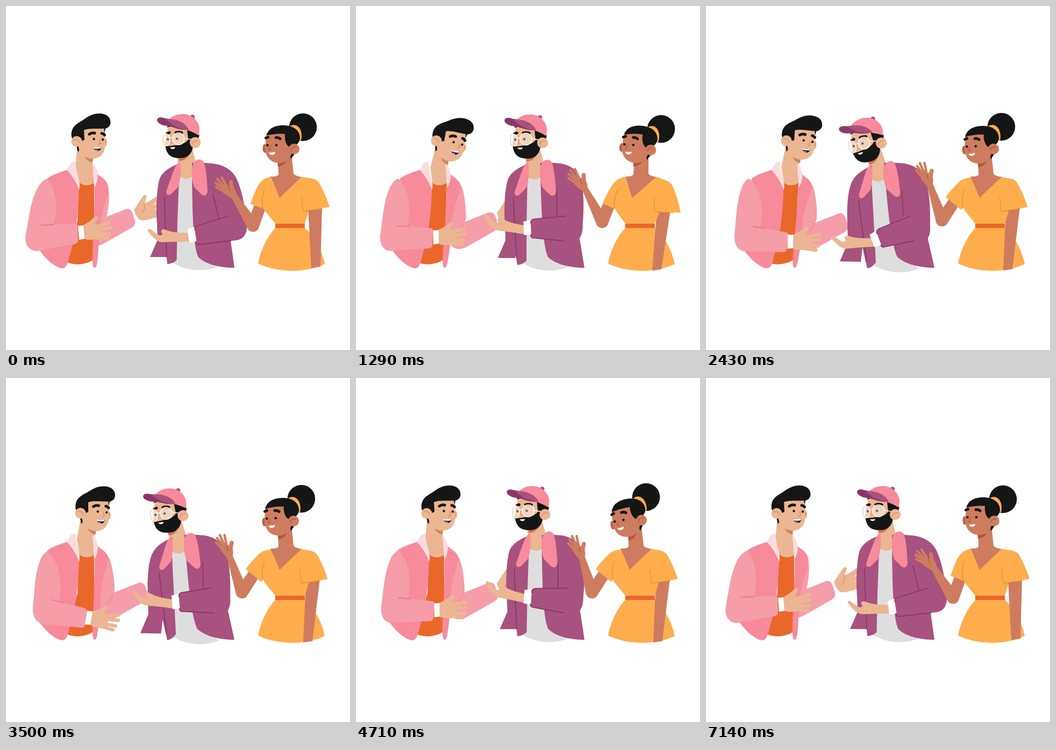
An HTML page for the animation above (7.21 s loop, 640 by 640 pixels).

```html
<!DOCTYPE html>
<html lang="en">
<head>
<meta charset="utf-8">
<title>Three friends talking</title>
<style>
html, body { margin: 0; width: 100%; height: 100%; overflow: hidden; background: #fff; }
svg { display: block; width: 100%; height: 100%; }
.pink { fill: #f78a9b; } .rose { fill: #f59da8; } .blush { fill: #fbdcde; } .orange { fill: #ea672a; }
.skin { fill: #ebb691; } .ink { fill: #151616; } .plum { fill: #a8527f; } .wine { fill: #8c3668; }
.grey { fill: #dedede; } .tan { fill: #ce7c5f; } .gold { fill: #ffad4d; } .white { fill: #fff; }
.line { fill: none; stroke-linecap: round; stroke-linejoin: round; stroke-width: 1.3; }
.brow { stroke: #151616; stroke-width: 5; }
</style>
</head>
<body>
<svg viewBox="0 0 640 640">
  <g id="left">
    <g id="farArm">
      <path class="skin" d="M239 378L254 355Q258 349 262 354L258 367Q270 362 280 354L286 356L286 362L273 370L286 366L286 374L276 378L286 377L286 390Q262 401 249 398Q241 391 238 378Z"/>
      <path class="line" stroke="#d58f66" d="M257 367Q260 379 253 384"/>
      <path class="rose" d="M152 406L223 378C230 376 234 381 236 387L240 400C241 406 238 410 233 413L180 443C166 449 156 445 152 437Z"/>
    </g>
    <path id="shirtL" class="orange" d="M135 326L164 326L164 400L163 472Q138 487 111 476L133 400Z"/>
    <path id="coatL" class="pink" d="M113 305C98 310 84 315 77 321L66 350L62 454C75 472 92 487 105 488C115 488 116 470 122 452C131 420 135 375 136 338L130 310Z"/>
    <path id="stripL" class="pink"/>
    <path id="upperL" class="rose"/>
    <path id="neckL" class="skin" d="M133 258L129 300L137 329Q150 338 164 329L161 292L162 270Z"/>
    <path id="collarL" class="blush" d="M113 305L120 293Q125 289 130 290C128 310 141 325 136 342Q128 320 113 305ZM161 292Q170 300 171 318Q169 332 164 338Z"/>
    <g id="headL">
      <path fill="#cb8560" d="M146 279L162 283L161 291Q150 289 146 279Z"/>
      <path class="ink" d="M131 260L139 263L134 272Z"/>
      <ellipse class="skin" cx="184.5" cy="254" rx="3.5" ry="7.5"/>
      <path class="line" stroke="#cf7f5a" d="M185 249Q187 253 184 259"/>
      <path class="skin" d="M143 226L183 226L185 252C186 272 177 283 162 284C146 284 136 274 134 258Z"/>
      <path class="ink" d="M122 243C120 226 130 220 142 213C152 206 160 200 174 200C188 200 195 208 194.5 217C194 224 189 227 185 228L183.5 236L182 228C168 229 154 227 145 231L146 249L139 252L124 250Z"/>
      <circle class="skin" cx="131.5" cy="252" r="10"/>
      <path class="line" stroke="#d58f66" d="M126 249Q134 247 137 255"/>
      <path class="line brow" d="M155 238.5Q160 235 165 236.5M178 237Q181 237 183.5 240"/>
      <circle class="ink" cx="163.5" cy="247.5" r="2.2"/>
      <circle class="ink" cx="180" cy="248.5" r="2.2"/>
      <path class="line" stroke="#dd8259" d="M174.5 248L176 256L172 257"/>
      <path class="ink" d="M162 262Q170 264 177 261.5C178 268 172 271 168 269Q163 267 162 262Z"/>
      <path class="white" d="M162 262Q170 264 177 261.5L176 265Q169 266 163 265Z"/>
      <path fill="#c06aa0" d="M165 267.5Q169 265 172 269Q168 270 165 267.5Z"/>
    </g>
    <g id="armL">
      <path id="sleeveL" class="rose"/>
      <path id="creaseL" class="line" stroke="#dc7484"/>
    </g>
    <g id="handL">
      <path class="skin" d="M3 -13C12 -17 20 -24 26 -30Q33 -31 31 -25L25 -16L34 -12L38 8L34 13L12 14L5 12Z"/>
      <path class="line" stroke="#ebb691" style="stroke-width:6.4" d="M25 -10L52 -18M27 -4L54.5 -8.500M27 4L52 3M25 10L49 11"/>
      <path class="white" d="M-6 -12L4 -13L6 12L-4 14Z"/>
    </g>
  </g>

  <g id="middle">
    <path id="shirtM" class="grey" d="M320 316L347 316L352 440L395 485Q350 501 310 478L316 470Z"/>
    <path id="neckM" class="skin" d="M318 272L323 317Q335 326 347 317L353 290L346 262Z"/>
    <path id="coatM" class="plum"/>
    <path id="bodyM" class="plum"/>
    <path id="collarM" class="pink" d="M324 290C315 292 311 310 298 345Q299 355 307 350L320 337Q328 315 324 290ZM346 300C350 284 362 282 368 290C373 305 374 325 375 345Q373 356 364 351L350 337Q344 322 346 300Z"/>
    <path id="seamM" class="line" stroke="#8c3668" style="stroke-width:1.8" d="M295 355Q296 410 299 467"/>
    <g id="headM">
      <path fill="#d0764f" d="M320 279L342 274Q335 289 322 288Z"/>
      <path class="skin" d="M303 222L338 228L346 255L336 280L302 275L296 261L298 240Z"/>
      <path class="ink" d="M337 230L360 240L357 250L346 264L339 250ZM299 226L304 219L310 223Z"/>
      <path class="ink" d="M296.5 259C300 262 308 260 315 259C325 258 335 256 340 247L348 261C346 277 335 284 322 283C308 283 298 277 296.5 259Z"/>
      <path class="white" d="M305 263L315 262.5C314 267 307 267.5 305 263Z"/>
      <path class="line brow" d="M300 237L304 235.5M316 235.5Q322 234 327 236"/>
      <path class="line" stroke="#e08a5e" d="M308 246L305 254L309 255"/>
      <circle class="ink" cx="301" cy="248" r="2.3"/>
      <circle class="ink" cx="318" cy="247" r="2.3"/>
      <g stroke="#fdf5ee" stroke-width="1.7" fill="#fff" fill-opacity=".38">
        <circle cx="321" cy="247" r="11"/>
        <ellipse cx="298.5" cy="249" rx="6.5" ry="11"/>
        <path fill="none" d="M304.5 246Q307 244 310 246M332 246L345 248.5"/>
      </g>
      <path class="line" stroke="#efcbb0" d="M294 239C290 245 291 258 297 260"/>
      <circle class="skin" cx="352" cy="254" r="10.2"/>
      <path class="line" stroke="#d58f66" d="M346 257Q348 249 357 251"/>
      <circle class="plum" cx="347" cy="206.5" r="4.2"/>
      <path class="pink" d="M300 216C306 205 318 201 330 201C349 202 360 217 360 229L359 241C350 236 341 231 330 229Z"/>
      <path class="wine" d="M281 213C281 207 287 206 296 209C315 211 331 216 340 230C326 232 316 227 305 224C294 223 283 220 281 213Z"/>
      <path class="plum" d="M297 209.5C318 210 333 216 340 230C323 230 307 222 297 209.5Z"/>
    </g>
    <path id="foreM" class="plum"/>
    <path id="handM" class="skin" d="M3 -5L-20 -6C-30 -7 -38 -9 -45 -12C-51 -13 -53 -7 -48 -4C-50 0 -55 0 -58 -3L-69 -11C-74 -15 -78 -11 -74 -7C-66 3 -58 12 -48 12L-20 11L3 11Z"/>
    <path id="cuffM" class="white" d="M-2 -12.5L11 -16.5L15 11L1.5 12.5Z"/>
    <path id="foldM" class="line" stroke="#8c3668" style="stroke-width:1.8"/>
  </g>

  <g id="right">
    <path id="upperR" class="tan"/>
    <path id="foreR" class="tan"/>
    <g id="handR">
      <path class="tan" d="M5 -1L-4 5L-20 -5L-24 -13L-17 -20L-9 -17L-2 -18L3 -10Z"/>
      <path class="line" stroke="#ce7c5f" style="stroke-width:4.6" d="M-12 -16L-23 -34M-16 -15L-31 -31M-18 -13L-34 -24M-18 -8L-33 -16"/>
      <path class="line" stroke="#ce7c5f" style="stroke-width:7.4" d="M-3 -9L-5.5 -25"/>
      <path class="line" stroke="#b4583c" d="M-9 -20Q-12 -13 -7 -9"/>
    </g>
    <path class="gold" d="M501 413C484 431 473 457 469 479C505 497 558 497 593 480C588 456 575 429 556 413Z"/>
    <path id="armR" class="tan"/>
    <g id="torsoR">
      <path class="gold" d="M492 318L509 356L550 318L572 326L563 382L556 405L501 405L480 379L474 345Z"/>
      <path id="sleeveR" class="gold" d="M492 318C478 320 471 329 467 338C462 348 458 358 455 368L490 381.500L500 345Z"/>
      <path class="line" stroke="#ec8e2d" d="M481 341Q474 357 478 376"/>
      <g id="sleeveFar">
        <path class="gold" d="M550 318C565 320 576 321 581 327C588 337 597 358 602 374L553 382L540 345Z"/>
        <path class="line" stroke="#ec8e2d" d="M550 357L553 382L588 377"/>
      </g>
      <path class="tan" d="M506 285L507 314Q503 318 492 317L509 357L550 318Q537 316 535 312L531 275Z"/>
    </g>
    <path class="orange" d="M501 405H556V413H501Z"/>
    <g id="headR">
      <path fill="#b5573a" d="M505 289L523 286Q518 298 506 299Z"/>
      <circle class="ink" cx="552.5" cy="225.5" r="25.8"/>
      <path class="gold" d="M526 225C540 214 554 229 549 250L540 252Z"/>
      <path class="ink" d="M527 270L537 275L530 285Z"/>
      <ellipse cx="481.5" cy="265" rx="4" ry="8" fill="#b96246"/>
      <path class="tan" d="M485 236L520 232L533 262C533 282 522 292 508 292C491 291 482 280 482 262Z"/>
      <path class="ink" d="M485 241C487 228 500 222 515 222C536 222 547 232 547 246C546 255 540 260 529 263C521 260 518 250 519 238Q500 237 485 241Z"/>
      <circle class="tan" cx="536" cy="266" r="10"/>
      <path class="line" stroke="#ae5639" d="M530 269Q531 260 540 263"/>
      <path class="line brow" d="M483.5 245.5L487.5 244M502 245Q506 244 510 247"/>
      <circle class="ink" cx="486.5" cy="259" r="2.3"/>
      <circle class="ink" cx="503" cy="259" r="2.3"/>
      <path class="line" stroke="#b4583c" d="M492 260L489 267L493 268"/>
      <path class="white" d="M489 272.5Q495 273 501 271.5C501 278 491 279 489 272.5Z"/>
    </g>
  </g>
</svg>
<script>
const LOOP = 7210;
const $ = id => document.getElementById(id);
const set = (id, key, value) => $(id).setAttribute(key, value);

// Only cloth that truly changes shape has two poses.
const cloth = {
  stripL: ['M169 312C178 319 186 323 189 332C193 345 192 365 188 388C180 410 175 430 172 446C171 470 170 487 165 487C160 487 161 470 161 455Q165 390 165 330Z',
    'M169 312C178 319 186 323 190 332C198 350 201 370 202 395C195 420 180 430 174 446C171 470 170 487 165 487C160 487 161 470 161 455Q165 390 165 330Z'],
  upperL: ['M191 345C186 362 178 380 176 402L173 444L188 388C192 370 192 355 191 345Z',
    'M192 335C187 352 178 375 176 400L175 445L202 395C201 370 198 350 192 335Z'],
  sleeveL: ['M77 321C60 326 50 355 45 380L37 424C33 445 45 459 62 455L128 443Q135 441 134 435L133 409Q132 404 127 405L89 406C95 385 97 345 77 321Z',
    'M80 321C66 326 61 355 57 380L53.5 422C51 443 59 457 75 456L143 458Q149 458 150 453L153.5 428Q154 422 149 421L102 412C107 385 108 345 80 321Z'],
  creaseL: ['M65 408L89 406.5', 'M87 410L110 414'],
  coatM: ['M322 293C305 300 290 308 285 324C280 345 279 380 281 405L282 435L268 467L299 467L299 467L300 480Q310 480 317.5 473L319 400L322 320Z',
    'M309 297C292 304 277 314 271 328C263 345 262 380 263 405L264 440L249 475L288 476L291 449L300 488Q309 487 316 477L312 400L308 325Z'],
  bodyM: ['M346 292C360 290 372 292 385 293C403 297 415 305 421 322C427 345 426 380 423 408C423 418 421 426 418 430L417 433L425 487C395 487 368 479 357 466C348 440 347 390 346 320Z',
    'M346 292C360 290 372 292 385 293C408 296 425 308 431 326C440 347 446 380 448 408C449 424 442 434 428 436L418 437L425 487C395 487 368 479 357 466C348 440 347 390 346 320Z']
};

const number = /-?\d+(\.\d+)?/g;

function ease(t, from, to) {
  const u = Math.min(1, Math.max(0, (t - from) / (to - from)));
  return u * u * (3 - 2 * u);
}

// Goes from 0 to 1 between a and b, and back between c and d.
const swing = (t, a, b, c, d) => ease(t, a, b) - ease(t, c, d);

function morph(id, w) {
  const [rest, other] = cloth[id], goal = other.match(number);
  let n = 0;
  set(id, 'd', rest.replace(number, v => (+v + (goal[n++] - v) * w).toFixed(2)));
}

function place(id, x, y, turn, px = 0, py = 0) {
  set(id, 'transform', `translate(${x} ${y}) rotate(${turn}) translate(${-px} ${-py})`);
}

function shift(id, x, y = 0) {
  place(id, x, y, 0);
}

// Slants a part sideways around a level that stays put.
function slant(id, k, level, dx = 0, dy = 0) {
  set(id, 'transform', `matrix(1 0 ${k} 1 ${dx - k * level} ${dy})`);
}

function limb(id, x1, y1, r1, x2, y2, r2) {
  const len = Math.hypot(x2 - x1, y2 - y1), nx = (y1 - y2) / len, ny = (x2 - x1) / len;
  set(id, 'd', `M${x1 + nx * r1} ${y1 + ny * r1}L${x2 + nx * r2} ${y2 + ny * r2}A${r2} ${r2} 0 0 0 ${x2 - nx * r2} ${y2 - ny * r2}` +
    `L${x1 - nx * r1} ${y1 - ny * r1}A${r1} ${r1} 0 0 0 ${x1 + nx * r1} ${y1 + ny * r1}Z`);
}

function drawLeft(t) {
  const lean = swing(t, 300, 2000, 2430, 3500);
  const reach = swing(t, 100, 1200, 5800, 7070);
  const bend = swing(t, 600, 1950, 4100, 5560);
  const dip = swing(t, 2430, 3500, 3500, 4550);
  const head = swing(t, 500, 1290, 2430, 4300);
  const nod = swing(t, 500, 1290, 1290, 2430);

  shift('farArm', 24 * reach, 3 * reach + 5 * lean);
  slant('shirtL', -.05 * lean, 487);
  for (const id of ['coatL', 'collarL']) shift(id, 8.5 * lean);
  for (const id of ['stripL', 'upperL']) {
    morph(id, reach);
    slant(id, -.045 * lean, 487);
  }
  slant('neckL', (8 * lean - 15 * head) / 65, 330, 8 * lean);
  place('headL', 131 + 18 * head, 252 - 1.3 * head, 6.5 * head + 6 * nod, 131, 252);

  for (const id of ['sleeveL', 'creaseL']) morph(id, bend);
  set('armL', 'transform', `translate(${-3 * dip} ${-3.5 * dip}) skewY(${4 * dip})`);
  place('handL', 140 + 17 * bend - 3 * dip, 421 + 17 * bend + 8 * dip, 6 * bend + 8 * dip);
}

function drawMiddle(t) {
  const lean = swing(t, 800, 2430, 3300, 4850);
  const nod = swing(t, 1290, 2430, 2430, 4300);
  const lift = swing(t, 4750, 5710, 5710, 7150);
  const dip = swing(t, 800, 2430, 2430, 4200);
  const hold = swing(t, 0, 1200, 5750, 7150), elbow = 1 - hold;

  morph('coatM', lean);
  morph('bodyM', elbow);
  slant('bodyM', .077 * lean, 487);
  slant('shirtM', .09 * lean, 475, 0, 4 * lean);
  slant('seamM', .095 * lean, 467, 0, 8 * lean);
  slant('neckM', .09 * lean, 320, -15 * lean, 5 * lean);
  place('collarM', 340 - 15 * lean, 320 + 4 * lean, -3 * lean, 340, 320);
  place('headM', 352 - 22 * lean - 4 * nod + 2 * lift, 254 + 3 * lean - 2 * nod, 6.5 * lift - 13 * nod, 352, 254);

  const x = 339.5 - 26.5 * hold - 4 * lean, y = 427.5 - 20.5 * hold + 30 * dip;
  const cuff = 11 * hold - 24 * dip;
  place('handM', x, y, 13 * hold - 16 * dip);
  place('cuffM', x, y, cuff);

  // The sleeve end turns with the cuff; its far end follows the elbow.
  const c = Math.cos(cuff * Math.PI / 180), s = Math.sin(cuff * Math.PI / 180);
  const p = (u, v) => `${x + u * c - v * s} ${y + u * s + v * c}`;
  const upper = `M${393 - 13 * lean + 20 * elbow} 391L${p(17, -19)}Q${p(11, -17)} ${p(12, -11)}`;
  const lower = `${p(14, 11)}Q${p(15, 17)} ${p(20, 16)}L${386 + 32 * elbow} 437`;
  const pit = `M${376 - 11 * lean + 9 * elbow} ${344 + 6 * elbow}L${376 - 9 * lean + 20 * elbow} ${391 + 4 * elbow}`;
  set('foreM', 'd', `${upper}L${lower}Z`);
  set('foldM', 'd', `${pit}${upper}M${lower}`);
}

function drawRight(t) {
  const turn = swing(t, 0, 950, 1250, 2400);
  const raise = swing(t, 1290, 2400, 4750, 5850);
  const sway = swing(t, 1290, 2400, 4750, 6700);
  const bow = swing(t, 3500, 4750, 4750, 6200);

  slant('torsoR', -.1 * turn, 405);
  place('sleeveR', 488, 335, 19 * raise, 488, 335);
  const tilt = .2 * turn;
  set('sleeveFar', 'transform', `matrix(1 ${tilt} 0 1 ${-3.5 * sway} ${-550 * tilt})`);
  place('headR', 536 + 12.5 * turn - sway - 4 * bow, 265 + 2 * turn - 1.5 * bow, 4 * turn - 3 * sway - 8 * bow, 536, 265);

  const foot = 585 - 17 * turn - 15 * sway, low = 485 + (585 - foot) * .3;
  const top = 562 - 2 * turn - 4 * sway;
  set('armR', 'd', `M${top} 376L${top + 26} 374L${foot} ${low}L${foot - 17} ${low + 2.5}Z`);

  const ex = 459.5 - 1.5 * turn - 20.5 * raise, ey = 408.5 - 7 * turn - 10 * raise;
  const wx = 424 + 2 * turn - 7.5 * raise + 4 * bow, wy = 353 - 13 * turn - 21 * raise + 2 * bow;
  limb('upperR', 473 - turn - 13 * raise, 372 - 6 * turn - 5 * raise, 11, ex, ey, 11.5);
  limb('foreR', ex, ey, 11.5, wx, wy, 5.5);
  place('handR', wx, wy, 7 * turn + 20 * raise);
}

const start = performance.now();
function tick() {
  const t = (performance.now() - start) % LOOP;
  drawLeft(t);
  drawMiddle(t);
  drawRight(t);
  requestAnimationFrame(tick);
}
tick();
</script>
</body>
</html>
```
